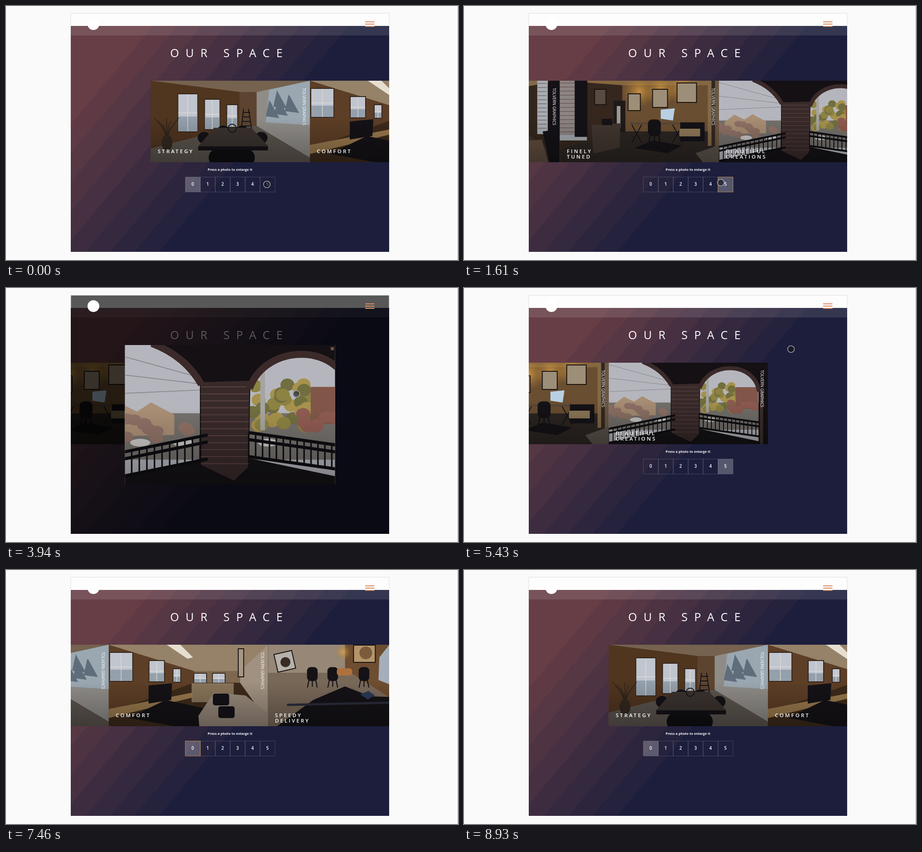
Animation, 998 px wide and 561 px high, one loop 9.03 s. Source, as an HTML page:

```html
<!DOCTYPE html>
<html lang="en">
<head>
<meta charset="utf-8">
<title>Our space</title>
<style>
html, body { margin: 0; width: 100%; height: 100%; overflow: hidden; background: #fafafa; }
svg { display: block; }
#stage { width: 998px; height: 561px; }
text { font-family: "Open Sans", "Noto Sans", sans-serif; fill: #fff; }
.title { font-size: 25px; letter-spacing: 14.5px; }
.caption { font-size: 11.5px; font-weight: 600; letter-spacing: 3.1px; }
.side { font-size: 8.8px; font-weight: 500; }
.hint { font-size: 7.3px; font-weight: 700; letter-spacing: .13px; text-anchor: middle; }
.digit { font-size: 9.8px; font-weight: 600; text-anchor: middle; }
.cell { stroke: rgba(255, 255, 255, .17); }
</style>
</head>
<body>
<svg id="stage" viewBox="0 0 998 561" xmlns="http://www.w3.org/2000/svg"></svg>
<script>
const LOOP = 9030, W = 351.6, H = 180, CARD_X = 319.4, CARD_Y = 165, CELL = 33;
const INK = '#141216';

const range = (n, f) => Array.from({ length: n }, (_, i) => f(i)).join('');
const poly = (fill, points) => `<polygon fill="${fill}" points="${points}"/>`;
const box = (fill, x, y, w, h, r = 0) => `<rect fill="${fill}" x="${x}" y="${y}" width="${w}" height="${h}" rx="${r}"/>`;
const oval = (fill, x, y, rx, ry = rx) => `<ellipse fill="${fill}" cx="${x}" cy="${y}" rx="${rx}" ry="${ry}"/>`;
const line = (stroke, w, d) => `<path d="${d}" fill="none" stroke="${stroke}" stroke-width="${w}"/>`;
const glow = (x, y, r) => oval('url(#glow)', x, y, r);

function seeded(seed) {
  return (lo, hi) => {
    seed = (seed * 16807) % 2147483647;
    return lo + (hi - lo) * seed / 2147483647;
  };
}

// Five surfaces around a back wall x0..x1, y0..y1.
const room = (x0, y0, x1, y1, [back, left, right, ceil, floor]) => box(back, 0, 0, W, H) +
  poly(ceil, `0,0 ${W},0 ${x1},${y0} ${x0},${y0}`) +
  poly(left, `0,0 ${x0},${y0} ${x0},${y1} 0,${H - 30}`) +
  poly(right, `${W},0 ${x1},${y0} ${x1},${y1} ${W},${H - 10}`) +
  poly(floor, `0,${H - 30} ${x0},${y1} ${x1},${y1} ${W},${H - 10} ${W},${H} 0,${H}`);
const sash = (x, y, w, h) => box('#35261c', x - 2, y - 2, w + 4, h + 4) + box('#c0c5ce', x, y, w, h) +
  box('#94a0ac', x, y + h * .6, w, h * .4) + line('#dcdad6', 1.3, `M${x} ${y + h / 2}h${w}M${x + w / 2} ${y}v${h}`);
const frame = (x, y, w, h, fill) => box('#18120f', x, y, w, h) + box(fill, x + 2, y + 2, w - 4, h - 4);
const desk = (x, y, w) => box('#5a4738', x, y, w, 5) +
  range(2, i => line(INK, 2, `M${x + 4 + i * (w - 30)} ${y + 5}l22 40m0 -40l-22 40`));
const seat = (x, y, s) => `<g transform="translate(${x} ${y}) scale(${s})">` +
  line(INK, 2.5, 'M-8 14L-12 34M8 14L12 34M0 14V32') + box(INK, -13, -16, 26, 34, 9) + '</g>';
const rug = (x, y, w, h) => poly(INK, `${x},${y + h * .6} ${x + w * .4},${y} ${x + w},${y + h * .4} ${x + w * .7},${y + h}`);
const bricks = (x, y, w, n) => range(n, i => line('#5d4542', 1, `M${x} ${y + i * 9}h${w}`));

const scenes = [
  () => {
    const rnd = seeded(7);
    return room(196, 25, 234, 100, ['#5d4430', '#50351f', '#8f8c88', '#75624f', '#5b544e']) +
      range(3, i => sash(61 + 64 * i - 5 * i * i, 30 + 12 * i, 42 - 10 * i, 82 - 17 * i)) +
      poly('#9aa7b1', `262,20 ${W},0 ${W},98 254,92`) +
      range(5, () => { const x = rnd(262, 320), y = rnd(15, 45); return poly('#5f6d7b', `${x},${y} ${x + 22},${y + 40} ${x - 8},${y + 36}`); }) +
      line(INK, 2, 'M205 62L200 108M216 62L223 108' + range(4, i => `M203 ${70 + i * 10}h17`)) +
      range(7, i => line('#2b241b', 1.5, `M36 128Q${30 + i * 2} 105 ${8 + i * 9} ${82 + i % 3 * 7}`)) + oval('#33281f', 36, 137, 12, 18) +
      range(4, i => oval(INK, 118 + i * 42, i % 3 ? 112 : 126, 14, 13)) +
      poly('#3a322f', '140,104 222,104 260,145 105,145') + box(INK, 105, 145, 154, 9) +
      box('#0f0e11', 128, 150, 102, 40, 20) + '<circle cx="180" cy="105" r="9" fill="none" stroke="#141216" stroke-width="2"/>';
  },
  () => room(188, 58, 290, 84, ['#7d674e', '#5d3e26', '#a09180', '#958269', '#3c2a1a']) +
    poly('#e6dfd0', '128,0 158,0 186,28 174,31') +
    range(3, i => sash(3 + 104 * i - 17 * i * i, 18 + 18 * i, 49 - 17 * i, 62 - 17 * i)) +
    range(2, i => sash(189 + i * 41, 64, 26, 20)) +
    box('#877359', 183, 85, 93, 42) + poly('#98784c', '0,142 184,106 188,116 0,162') + rug(44, 122, 205, 66) +
    poly(INK, '88,90 140,85 138,122 88,130') + frame(285, 8, 14, 64, '#a69886') +
    poly('#97887b', '198,157 232,106 302,112 352,152 352,180 200,180') +
    range(2, i => box(INK, 230 + i * 12, 108 + i * 28, 36, 26, 5)),
  () => room(0, 0, 170, 54, ['#8b7b6a', '#8f8070', '#6e4d30', '#8f8070', '#786858']) +
    box('#968776', 0, 0, 170, 62) + frame(188, 0, 50, 40, '#b3946b') + oval('#7b5b3a', 216, 18, 14) +
    `<g transform="rotate(-13 36 36)">${frame(16, 16, 42, 42, '#b5b1ab')}${oval('#382b24', 38, 39, 11)}</g>` +
    poly('#a4afbb', '246,28 268,0 300,0 300,100 244,78') + glow(166, 16, 18) +
    range(3, i => seat(98 + i * 33 + i * i * 12, 64, .9)) + box('#ae713d', 152, 52, 34, 16, 6) +
    poly(INK, '20,180 100,122 170,92 226,114 352,118 352,180') + poly('#2a3857', '204,110 222,102 236,112 220,121') +
    line('#2b2c3a', 5, 'M42 133L270 128L352 148') + box(INK, 329, 0, 23, H),
  () => room(134, 14, 272, 112, ['#634730', '#3b332c', '#33261c', '#84694b', '#3d352e']) +
    poly('#a3a8b1', '36,0 54,0 54,136 42,154') + glow(183, 32, 46) +
    range(3, i => frame(70 + i * 24, 38 + i * 6, 18 - i * 2, 36 - i * 3, '#a59c8e')) + frame(168, 33, 47, 39, '#4c3d30') +
    box('#a8adb4', 302, 0, 23, 118) + bricks(303, 6, 20, 12) + box(INK, 326, 0, 26, 110) +
    desk(62, 107, 79) + desk(160, 106, 56) + frame(170, 76, 34, 25, '#20252b') + rug(128, 138, 105, 28) + seat(176, 112, 1.1) +
    range(13, i => line('#a39b83', 1.4, `M249 122Q247 101 ${228 + i * 4} ${86 + i % 4 * 6}`)) + box('#7b7d77', 244, 118, 10, 20) +
    poly('#5f4c3e', '206,180 230,138 312,130 326,180') + poly(INK, '314,112 352,107 352,180 328,180'),
  () => room(138, 10, 328, 112, ['#6a4e31', '#35271e', '#4d3c2a', '#85673f', '#2c2622']) +
    box('#8d8584', 0, 0, 34, 128) + bricks(0, 5, 34, 14) + box('#a4a9ae', 0, 120, 60, 12) + box(INK, 33, 0, 28, 124) +
    range(3, i => glow(175 + i * 48, 24 - i * 4, 36)) +
    range(4, i => frame(76 + i * 62 + (i && 20 - i * 8), 18 + i % 2 * 10 - (i > 2 ? 24 : 0), 27 + i * i * 2, 36 + i * 3, i ? '#9d8e78' : '#574b42')) +
    box('#1f1919', 119, 44, 26, 70) + box('#9d9a92', 126, 56, 8, 48) +
    poly('#41362f', '70,98 134,94 132,148 74,161') + box(INK, 93, 84, 23, 14) +
    desk(155, 92, 120) + poly('#b9d0e4', '223,64 254,61 250,88 223,84') + rug(164, 132, 106, 28) + seat(209, 103, 1.1) +
    box(INK, 266, 92, 54, 42) + box('#8e7858', 264, 106, 46, 17) +
    range(3, i => box(['#826a49', '#332820', '#6c5842'][i], 327 + i * 8, 0, 9, 144)) + poly('#5b524b', '300,160 352,142 352,180 316,180'),
  () => {
    const rnd = seeded(11);
    const rail = (x, w, y, dy) => line('#0d0c10', 4, `M${x} ${y}l${w} ${dy}m0 9l${-w} ${-dy}m0 22l${w} ${dy}`) +
      range(15, i => line('#100f13', 2, `M${x + i * w / 15} ${y + i * dy / 15}v32`));
    return box('#b5b6bd', 0, 0, W, H) + box('#74706c', 0, 88, W, 60) +
      range(3, i => line('#85858c', 1, `M0 ${4 + i * 30}L137 ${42 + i * 8}`)) +
      poly('#a88e74', '12,92 34,75 56,86 74,74 104,90 104,116 14,118') +
      range(18, () => oval('#8f7166', rnd(0, 137), rnd(94, 125), 9, 7)) +
      range(34, i => oval(['#8c8242', '#a6924c', '#716e3f'][i % 3], rnd(205, 278), rnd(50, 105), 9, 8)) +
      box('#815649', 280, 54, 50, 48) + range(14, () => oval('#8f5b51', rnd(270, 328), rnd(88, 110), 9, 7)) +
      box('#a6a4a2', 215, 10, 6, 100) + range(4, i => oval('#c9c8c6', 60 + i * 55, 126, 13, 5)) +
      poly(INK, '0,176 147,146 200,146 334,174 334,180 0,180') +
      `<path fill="#141014" d="M73 0H352V180H331V62C326 -4 220 -6 202 56L200 164L180 178L150 163L137 158V49Q111 11 73 0Z"/>` +
      poly('#392a2a', '138,48 201,46 199,158 181,175 139,155') + bricks(138, 54, 62, 12) +
      line('#3b2a29', 9, 'M75 -2Q118 14 139 51M201 56C222 -4 322 -4 332 64') + box('#3d2f2c', 334, 64, 7, 116) +
      rail(0, 147, 146, -30) + rail(200, 134, 113, 19);
  }
];
const captions = ['STRATEGY', 'COMFORT', 'SPEEDY DELIVERY', 'WELL EXECUTED', 'FINELY TUNED', 'BEAUTIFUL CREATIONS'];

// Diagonal bands blending from dark red to navy.
const mix = u => `rgb(${[[103, 28], [62, 30], [70, 60]].map(([a, b]) => Math.round(a + (b - a) * u))})`;
const backdrop = box(mix(0), 143, 44, 703, 499) + range(9, i => {
  const x = 325 + i * 54;
  return poly(mix((i + 1) / 9), `${x},44 846,44 846,543 ${x - 419},543`);
});

const card = (name, i) => `<g transform="translate(${i * W} 0)">
  <use href="#scene${i}" width="${W}" height="${H}"/>
  ${name.split(' ').map((word, j) => `<text class="caption" x="15.5" y="${160.3 + j * 11.5}">${word}</text>`).join('')}
  <text class="side" transform="translate(336 16) rotate(90)">TOLVERN GRAPHICS</text></g>`;

const button = i => `<rect class="cell" x="${396 + i * CELL}" y="377.8" width="${CELL}" height="${CELL}"/>
  <text class="digit" x="${412.3 + i * CELL}" y="397.4">${i}</text>`;

const stage = document.getElementById('stage');
stage.innerHTML = `<defs>
  <clipPath id="panel"><rect x="143" y="16" width="703" height="527"/></clipPath>
  <radialGradient id="glow"><stop stop-color="#e2a548" stop-opacity=".75"/><stop offset="1" stop-color="#b5802f" stop-opacity="0"/></radialGradient>
  <linearGradient id="shade" x2="0" y2="1"><stop offset=".45" stop-opacity="0"/><stop offset="1" stop-opacity=".3"/></linearGradient>
  ${scenes.map((draw, i) => `<symbol id="scene${i}" viewBox="0 0 ${W} ${H}" preserveAspectRatio="xMidYMid slice">
    ${draw()}${box('url(#shade)', 0, 0, W, H)}</symbol>`).join('')}
  </defs>
  ${box('#fafafa', 0, 0, 998, 561)}${box('#b8b8b8', 997, 0, 1, 561)}
  <g clip-path="url(#panel)">
    ${box('#fdfdfd', 143, 16, 703, 28)}${backdrop}${box('rgba(255,255,255,.11)', 143, 44, 703, 21)}
    <text class="title" x="362.5" y="113">OUR SPACE</text>
    <g id="strip">${captions.map(card).join('')}</g>
    <rect id="focus" x="${CARD_X}" y="${CARD_Y}" width="${W}" height="${H}" fill="none" stroke="#b8813f"/>
    <text class="hint" x="494.6" y="364">Press a photo to enlarge it</text>
    ${range(6, button)}
    <rect id="ring" y="377.8" width="${CELL}" height="${CELL}" fill="none" stroke="#b17d45"/>
    <rect id="dim" x="143" y="16" width="703" height="527"/>
    ${oval('#fff', 193, 40, 13)}
    ${range(3, i => line('#d98c60', 2, `M793 ${35 + i * 5}h20.5`))}
    <g id="viewer"><use id="photo" href="#scene5"/>
      <g id="close">${box('#4b332c', -4, -4, 8, 8)}${line('#d3a184', 1, 'M-2.5 -2.5l5 5m0 -5l-5 5')}</g></g>
  </g>
  <path d="M143 44V16H846V44" fill="none" stroke="#dedede"/>
  <circle id="cursor" r="7.4" fill="#14151d" fill-opacity=".62" stroke="#b5b3b3" stroke-width="1.4"/>`;

const [strip, focusBox, ring, dim, viewer, photo, closeMark, cursor] =
  ['strip', 'focus', 'ring', 'dim', 'viewer', 'photo', 'close', 'cursor'].map(id => document.getElementById(id));
const cells = [...document.querySelectorAll('.cell')];

const set = (node, attrs) => { for (const k in attrs) node.setAttribute(k, attrs[k]); };
const show = (node, on) => node.setAttribute('visibility', on ? 'visible' : 'hidden');
const clamp = u => Math.max(0, Math.min(1, u));

// The picture steps every 140 ms inside a burst and holds until the next one.
const STEP = 140;
const bursts = [[0, 910], [1250, 1250], [1610, 1610], [2070, 2070], [2340, 2530], [2940, 3940],
  [4060, 5000], [5430, 6400], [6520, 7460], [7620, 8520], [8930, 8930]];
function snap(t) {
  const [from, to] = bursts.filter(b => b[0] <= t + .5).pop();
  return t >= to ? to : from + Math.floor((t - from + .5) / STEP) * STEP;
}

// cubic-bezier(.25, .1, .25, 1), solved by bisection
function ease(u) {
  u = clamp(u);
  const at = (s, a, b) => 3 * (1 - s) ** 2 * s * a + 3 * (1 - s) * s * s * b + s ** 3;
  let lo = 0, hi = 1;
  for (let i = 0; i < 24; i++) {
    const mid = (lo + hi) / 2;
    if (at(mid, .25, .25) < u) lo = mid; else hi = mid;
  }
  return at(lo, .1, 1);
}

const PICK_LAST = 698, OPEN = 2940, CLOSE = 5430, PICK_FIRST = 6453, REST = 8520;

function slide(t) {
  if (t >= REST) return 0;
  return 5 * (ease((t - PICK_LAST) / 1608) - ease((t - PICK_FIRST) / 2240));
}

const path = [[0, 576, 394], [1610, 567, 390], [2070, 567, 390], [2530, 492, 268], [3090, 492, 268],
  [3940, 641, 234], [5000, 722, 135], [CLOSE, 722, 135], [6400, 414, 397], [6940, 416, 398], [7060, 416, 409]];
function pointer(t) {
  const i = path.findIndex(p => p[0] > t);
  if (i < 0) return path[path.length - 1].slice(1);
  const [t0, x0, y0] = path[i - 1], [t1, x1, y1] = path[i];
  const u = (t - t0) / (t1 - t0), k = u * u * (3 - 2 * u);
  return [x0 + (x1 - x0) * k, y0 + (y1 - y0) * k];
}

function render(now) {
  const t = snap(now % LOOP);
  strip.setAttribute('transform', `translate(${CARD_X - slide(t) * W} ${CARD_Y})`);

  const active = t >= PICK_LAST && t < PICK_FIRST ? 5 : 0;
  cells.forEach((c, i) => c.setAttribute('fill', i === active ? 'rgba(255,255,255,.25)' : 'none'));
  ring.setAttribute('x', 396 + active * CELL);
  show(ring, (t >= PICK_LAST && t < 2530) || (t >= PICK_FIRST && t < 8930));

  const open = t >= OPEN && t < CLOSE;
  dim.setAttribute('opacity', open ? .65 * clamp((t - OPEN + 20) / 190) : 0);
  show(focusBox, open);
  show(viewer, open && t > OPEN);
  const k = ease((t - 3090) / 850), cx = 490 + 4.5 * k, cy = 284 - 4 * k;
  set(photo, { x: cx - 232 * k, y: cy - 154 * k, width: 464 * k, height: 308 * k });
  closeMark.setAttribute('transform', `translate(${cx + 226 * k} ${cy - 146 * k})`);

  const [x, y] = pointer(t);
  set(cursor, { cx: x, cy: y });
  show(cursor, t < 7190);
}

const start = performance.now();
function loop() {
  render(performance.now() - start);
  requestAnimationFrame(loop);
}
loop();
</script>
</body>
</html>
```
